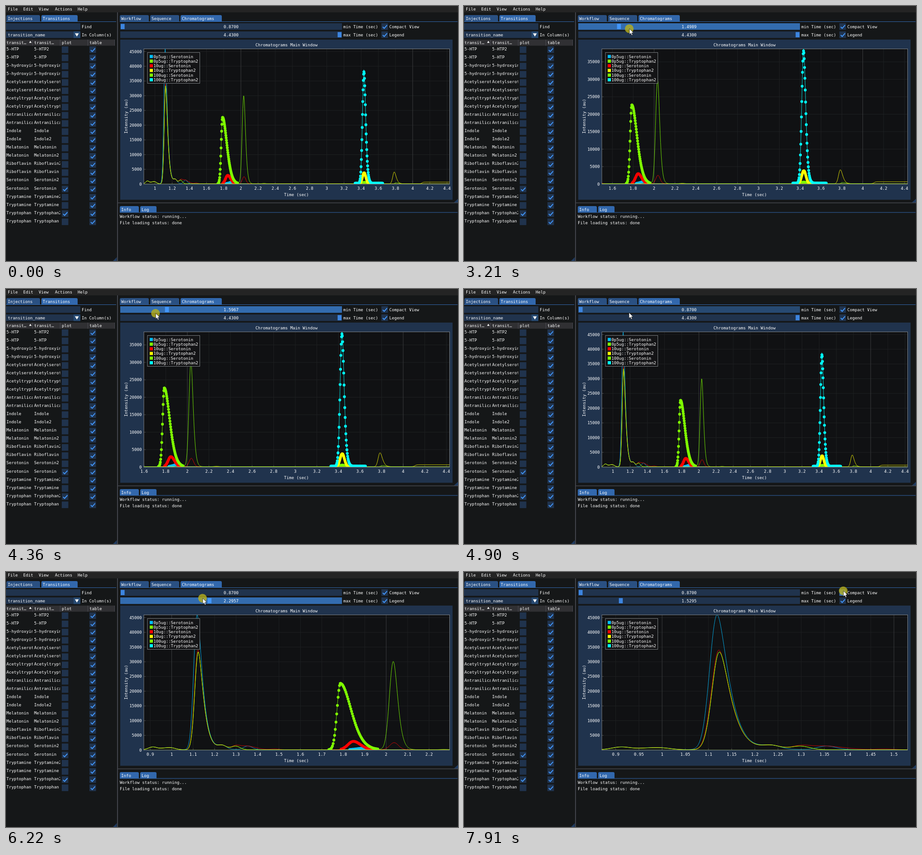
Write an HTML page that moves like this. It is 997 by 562 pixels and loops after 7.99 s.

```html
<!DOCTYPE html>
<html lang="en">
<head>
<meta charset="utf-8">
<title>Chromatograms</title>
<style>
html, body { margin: 0; width: 100%; height: 100%; overflow: hidden; background: #151718; }
svg { display: block; width: 997px; height: 562px; }
text { font: 9.1px "DejaVu Sans Mono", monospace; fill: #fff; white-space: pre; }
</style>
</head>
<body>
<svg id="stage" viewBox="0 0 997 562"></svg>
<script>
const LOOP = 7990, STEP = 76.923, FIRST = 588, LAST = 95;
const T0 = 0.87, T1 = 4.43;
const BOX = { l: 304, r: 978.5, t: 94.5, b: 392.5 };
const FRAME = '#20334d', HOVER = '#274a72', ACTIVE = '#336caf', BLUE = '#4296fa', GRAB = '#3d85e0', TAB = '#3268ad';

// ---------- drawing helpers ----------
const rect = (x, y, w, h, fill, more = '') =>
  `<rect x="${x}" y="${y}" width="${w}" height="${h}" fill="${fill}" ${more}/>`;
const text = (x, y, s, more = '') => `<text x="${x}" y="${y + 3.2}" ${more}>${s}</text>`;
const path = (d, stroke, w = 1, more = '') =>
  `<path d="${d}" fill="none" stroke="${stroke}" stroke-width="${w}" ${more}/>`;
const shape = (d, fill) => `<path d="${d}" fill="${fill}"/>`;
const mid = 'text-anchor="middle"';
const check = (x, y, on, fill = FRAME) =>
  rect(x, y, 14.5, 14.5, fill) + (on ? path(`M${x + 3} ${y + 8}l3.2 3.2 6.4-7`, BLUE, 2) : '');
const tab = (x, w, y, s, on) =>
  shape(`M${x} ${y + 14}v-11q0-3 3-3h${w - 6}q3 0 3 3v11z`, on ? TAB : '#2a5082') + text(x + 3, y + 7.5, s);

// ---------- fixed parts ----------
// Each name fills two rows; the digits tell which second-column cells end in 2
const names = [['5-HTP', '2', ''], ['5-hydroxyindole'], ['Acetylserotonin'], ['Acetyltryptamine'],
  ['Antranilicacid'], ['Indole', '', '2'], ['Melatonin', '', '2'], ['Riboflavin', '2', ''],
  ['Serotonin', '2', ''], ['Tryptamine', '2', ''], ['Tryptophan', '2', '']];
const plotted = ['Serotonin', 'Tryptophan2'];

function table() {
  let s = rect(0, 74, 239.5, 13.5, '#303033') +
    path('M58.5 74v13.5M119.5 74v13.5M180.5 74v13.5M239.5 74v13.5', '#4a4a52') +
    text(1, 81, 'transit…') + text(62, 81, 'transit…') +
    text(123, 81, 'plot') + text(184, 81, 'table') + shape('M51 81.3h5.4l-2.7-4.6z', '#fff');
  names.forEach(([name, ...ends], i) => {
    for (let j = 0; j < 2; j++) {
      const y = 94.3 + (2 * i + j) * 18.06, second = name + (ends[j] || '');
      s += text(1, y, name, 'clip-path="url(#col1)"') + text(62, y, second, 'clip-path="url(#col2)"') +
        check(123, y - 5.2, plotted.includes(second)) + check(184, y - 5.2, true);
    }
  });
  return s;
}

function leftPanel() {
  return tab(1, 74, 20, 'Injections') + tab(78, 80, 20, 'Transitions', true) + rect(0, 34, 243, 1, TAB) +
    rect(0, 38, 164, 14.5, FRAME) + text(167, 45.5, 'Find') +
    rect(0, 56, 164, 14.5, FRAME) + rect(149, 56, 15, 14.5, HOVER) + shape('M152 60.3h8.6l-4.3 7z', '#fff') +
    text(4, 63.5, 'transition_name') + text(167, 63.5, 'In Column(s)') +
    table() + shape('M244.5 562v-8.5l-8.5 8.5z', '#1f3a5f');
}

function rightPanel() {
  return tab(251, 64, 20, 'Workflow') + tab(318, 64, 20, 'Sequence') + tab(385, 91, 20, 'Chromatograms', true) +
    rect(251, 34, 745, 1, TAB) +
    text(744, 45.5, 'min Time (sec)') + text(744, 63.5, 'max Time (sec)') +
    text(845.5, 45.5, 'Compact View') + text(845.5, 63.5, 'Legend') +
    rect(252, 74, 733, 353, FRAME) + text(618.7, 85.5, 'Chromatograms Main Window', mid) +
    text(640.7, 416, 'Time (sec)', mid) +
    text(0, 0, 'Intensity (au)', mid + ' transform="translate(264.5 243) rotate(-90)"') +
    rect(BOX.l, BOX.t, BOX.r - BOX.l, BOX.b - BOX.t, '#101113') + shape('M997 425v8h-9z', '#1f3a5f') +
    tab(251, 42, 441, 'Info', true) + tab(296, 36, 441, 'Log', true) + rect(251, 454.5, 745, 1, TAB) +
    text(251, 464, 'Workflow status: running...') + text(251, 477.5, 'File loading status: done');
}

function staticPart() {
  const menu = [['File', 4], ['Edit', 38], ['View', 72], ['Actions', 108], ['Help', 158]];
  return `<defs>
    <clipPath id="col1"><rect y="74" width="59" height="420"/></clipPath>
    <clipPath id="col2"><rect x="61" y="74" width="58.5" height="420"/></clipPath>
    <clipPath id="plot"><rect x="${BOX.l}" y="${BOX.t}" width="${BOX.r - BOX.l}" height="${BOX.b - BOX.t}"/></clipPath>
    </defs>` +
    rect(0, 0, 997, 562, '#151718') + rect(0, 0, 997, 14, '#242424') +
    menu.map(([s, x]) => text(x, 7, s)).join('') + leftPanel() +
    rect(245, 14, 2, 548, '#42444b') + rect(247, 433, 750, 1.6, '#42444b') + rightPanel();
}

// ---------- signals ----------
// A peak with separate left and right widths; a small tail value gives a slower fall
const peak = (c, h, left = 0.02, right = left, tail = 1) => t => {
  const d = t - c;
  return h * Math.exp(-d * d / (2 * (d < 0 ? left * left : right * right * (1 + d / tail))));
};
const bump = (c, h) => peak(c, h * 950);
// The large first peak with the ripples around it
const front = (c, h, late = 1.298) => [peak(c, h, 0.0158, 0.0168, 0.03),
  bump(0.912, 1), bump(0.965, 0.5), bump(1, 0.6), bump(1.236, 1.4), bump(late, 1.3)];
const step = (c, h) => t => h / (1 + Math.exp((c - t) / 0.008));

const series = [
  { name: '0p5ug::Serotonin', color: '#00bfff', base: 150, dots: [1.83, 1.955],
    peaks: [...front(1.1185, 45780, 1.355), peak(1.895, 500, 0.03)] },
  { name: '0p5ug::Tryptophan2', color: '#7fff00', base: 20, dots: [3.33, 3.55],
    peaks: [peak(3.435, 550, 0.03), peak(3.81, 430, 0.02, 0.04)] },
  { name: '10ug::Serotonin', color: '#ff0000', base: 130, dots: [1.79, 1.955],
    peaks: [...front(1.1225, 33850), peak(1.35, 1250, 0.03, 0.04), bump(1.48, 0.25),
      peak(1.847, 2900, 0.025, 0.033), peak(2.037, 2400)] },
  { name: '10ug::Tryptophan2', color: '#ffff00', base: 110, dots: [3.34, 3.515],
    peaks: [...front(1.1235, 33200), peak(3.435, 3800), peak(3.785, 4000, 0.017, 0.019, 0.06), step(4.108, 560)] },
  { name: '100ug::Serotonin', color: '#7fff00', base: 110, dots: [1.733, 1.964],
    peaks: [...front(1.1235, 33200), peak(1.7865, 23000, 0.0155, 0.046, 0.3),
      peak(2.033, 30000, 0.018, 0.0175, 0.06), bump(2.27, 0.14)] },
  { name: '100ug::Tryptophan2', color: '#00ffff', base: 300, dots: [3.33, 3.652], short: true,
    peaks: [peak(3.4325, 38600, 0.017, 0.0176, 0.073)] },
];
const level = (s, t) => s.peaks.reduce((sum, f) => sum + f(t), s.base);

// ---------- plot ----------
// Rounds up to 1, 2 or 5 times a power of ten
function niceUp(v) {
  const p = 10 ** Math.floor(Math.log10(v));
  return p * [1, 2, 5, 10].find(f => v <= f * p);
}

function plot(lo, hi) {
  const { l, r, t, b } = BOX, kx = (r - l) / (hi - lo);
  const px = v => l + (v - lo) * kx;
  const lines = series.map(s => {
    const [from, to] = s.short ? s.dots : [T0, T1], end = Math.min(hi, to), pts = [];
    for (let v = Math.max(lo, from); v <= end; v += 0.8 / kx) pts.push([v, level(s, v)]);
    return pts;
  });
  const top = Math.max(1000, ...lines.flat().map(p => p[1]));
  const py = v => b - v / top * (b - t);
  const at = (v, y) => px(v).toFixed(2) + ' ' + py(y).toFixed(2);

  // Grid and tick labels
  const wide = niceUp((hi - lo) * 0.99) / 2, major = wide === 2.5 ? 2 : wide, minor = major / 10;
  let fine = '', bold = '', ticks = '', out = '';
  for (let i = Math.ceil(lo / minor - 1e-6); i * minor <= hi; i++) {
    const x = px(i * minor).toFixed(1);
    if (i % 10) fine += `M${x} ${t}V${b}`; else bold += `M${x} ${t}V${b}`;
    ticks += `M${x} ${b}v-${i % 10 ? 4 : 8}`;
    out += text(x, 402, +(i * minor).toFixed(3), mid);
  }
  // The signals only touch zero between the serotonin and tryptophan groups
  const zero = lo < 1.75 && hi > 1.75;
  for (let v = zero ? 0 : 5000; v <= top; v += 5000) {
    const y = py(v);
    if (v) fine += `M${l} ${y.toFixed(1)}H${r}`;
    ticks += `M${l} ${y.toFixed(1)}h4`;
    out += text(299.5, y, v, 'text-anchor="end"');
  }
  out += path(fine, '#1e2022') + path(bold, '#3b3d3f') + path(ticks, '#4a4c4e');

  // Traces, with the markers a little below the line's summit
  out += '<g clip-path="url(#plot)">';
  series.forEach((s, i) => {
    if (lines[i].length) out += path('M' + lines[i].map(q => at(...q)).join('L'), s.color, 0.85);
    let d = '';
    for (let v = s.dots[0]; v < s.dots[1]; v += 0.0033)
      if (v > lo - 0.02 && v < hi + 0.02) d += `M${at(v, level(s, v) * 0.98)}h0`;
    if (d) out += path(d, s.color, 6.2, 'stroke-linecap="round"');
  });
  const edge = 'stroke="#85898d" stroke-width="0.9"';
  out += '</g>' + rect(l, t, r - l, b - t, 'none', edge) +
    rect(312, 102.5, 115.5, 68, '#141416', 'fill-opacity="0.96" ' + edge);
  series.forEach((s, i) => {
    const y = 111.4 + i * 10.25;
    out += rect(317, y - 3.6, 7, 7, s.color) + text(325.3, y, s.name);
  });
  return out;
}

// ---------- motion ----------
// Drags are [tick, slider value, pointer y]; free moves are [tick, x, y]
const minDrag = [[28, T0, 46], [29, 1.15, 46], [32, 1.15, 46], [41, 2.72, 58], [43, 2.5625, 60],
  [44, 2.505, 60.5], [53, T0, 50]];
const maxDrag = [[61, T1, 63], [65, 2.45, 50], [66, 2.6617, 46], [67, 2.951, 45], [79, 1.6404, 67],
  [80, 1.546, 67], [81, 1.5295, 67]];
const moves = [[0, 503, -9], [10, 463, 122], [12, 455, 119], [17, 455, 119], [20, 346, 58], [24, 257, 46],
  [53, 257, 50], [56, 364, 52], [60, 735, 63], [81, 346, 67], [85, 720, 30], [90, 844, 34], [92, 837, 41.5]];

function tween(keys, n) {
  const j = keys.findIndex(k => k[0] >= n);
  if (j <= 0) return keys.at(j).slice(1);
  const a = keys[j - 1], b = keys[j], f = (n - a[0]) / (b[0] - a[0]);
  return a.slice(1).map((v, i) => v + (b[i + 1] - v) * f);
}

const grabX = v => 257.3 + (v - T0) / (T1 - T0) * 478.5;

// The slider trails the pointer by one tick
function pointer(n, drag) {
  if (!drag) return tween(moves, n);
  const [v, y] = tween(drag, n + 1);
  return [grabX(v) - 0.3, y];
}

function slider(y, v, held, over) {
  return rect(252, y, 489, 14.5, held ? ACTIVE : over ? HOVER : FRAME) +
    rect((grabX(v) - 4.3).toFixed(2), y + 1.5, 8.6, 11.5, held ? BLUE : GRAB) +
    text(496.5, y + 7.4, v.toFixed(4), mid);
}

const stage = document.getElementById('stage');
stage.innerHTML = staticPart() + '<g id="live"></g>';
const live = document.getElementById('live');
let shown = null;

function draw(n) {
  if (n === shown) return;
  shown = n;
  const holdMin = n >= 25 && n < 54, holdMax = n >= 61 && n < 82, press = n >= 94;
  const down = holdMin || holdMax || press;
  const [lo] = tween(minDrag, n), [hi] = tween(maxDrag, n);
  const [mx, my] = pointer(n, holdMin ? minDrag : holdMax ? maxDrag : null);
  const over = (x, y, w) => !down && mx >= x && mx <= x + w && my >= y && my <= y + 14.5;
  const box = (y, held) => check(828, y, true, held ? ACTIVE : over(828, y, 84) ? HOVER : FRAME);
  const arrow = n < 0 ? '' : `<path transform="translate(${mx} ${my})" fill="#fff" stroke="#111" stroke-width="0.7"
    d="M0 0V12.6L2.9 10 4.9 14.6 7 13.7 5 9.2H8.9z"/>`;
  live.innerHTML = slider(38, lo, holdMin, over(252, 38, 489)) + slider(56, hi, holdMax, over(252, 56, 489)) +
    box(38, press) + box(56, false) + plot(lo, hi) +
    (down ? `<circle cx="${mx - 0.5}" cy="${my}" r="9.6" fill="#b8b01c" fill-opacity="0.8"/>` : '') + arrow;
}

function play(now) {
  draw(Math.max(-1, Math.min(LAST, Math.floor((now % LOOP - FIRST) / STEP))));
  requestAnimationFrame(play);
}
play(performance.now());
</script>
</body>
</html>
```
